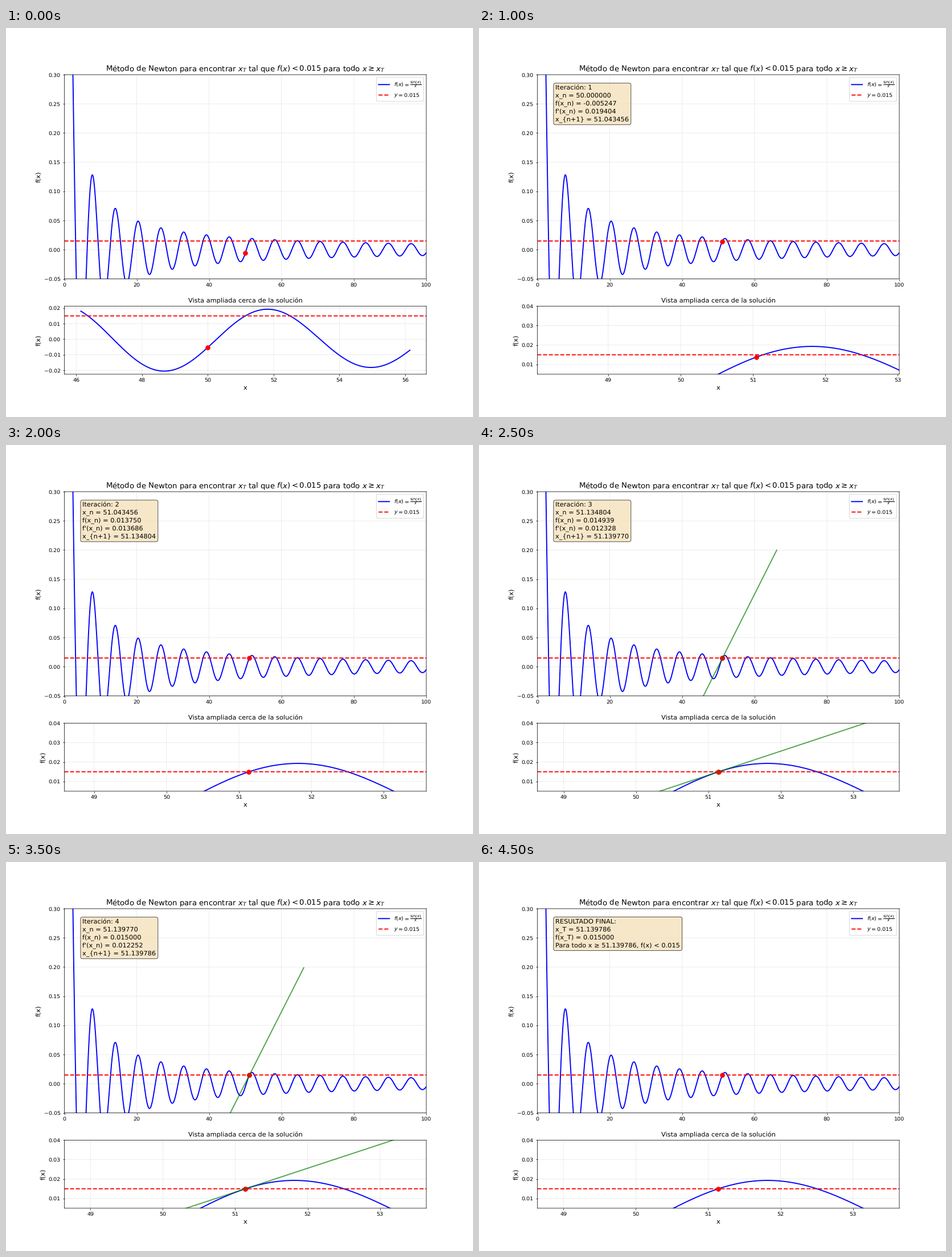
Write a matplotlib script that moves like this. It is 820 by 683 pixels and loops after 8 s.

```python
import numpy as np
import matplotlib.pyplot as plt
from matplotlib.animation import FuncAnimation

WIDTH, HEIGHT = 820, 683
DPI = WIDTH / 12
INTERVAL, FRAMES = 500, 16
THRESHOLD, START, STEPS = 0.015, 50.0, 4

# Soft, unsnapped rendering of text and lines.
plt.rcParams.update({"font.family": "DejaVu Sans", "text.hinting": "none",
                     "path.snap": False})


def f(x):
    return np.sin(x) / x


def slope(x):
    return np.cos(x) / x - np.sin(x) / x**2


guesses = [START]
for _ in range(STEPS):
    x = guesses[-1]
    guesses.append(x - (f(x) - THRESHOLD) / slope(x))
root = guesses[-1]

# The tiny surplus keeps the pixel size from being truncated.
fig, (top, zoom) = plt.subplots(
    2, 1, figsize=((WIDTH + 1e-4) / DPI, (HEIGHT + 1e-4) / DPI), dpi=DPI,
    gridspec_kw={"height_ratios": [3, 1]})


def add_artists(ax, xs):
    """Draw curve and threshold; return the moving dots and tangent."""
    ax.plot(xs, f(xs), "b-", lw=2, label=r"$f(x) = \frac{\sin(x)}{x}$")
    ax.axhline(THRESHOLD, color="r", ls="--", lw=2,
               label=rf"$y = {THRESHOLD}$")
    dots, = ax.plot([], [], "ro", ms=8)
    tangent, = ax.plot([], [], "g-", lw=2, alpha=0.7)
    ax.grid(True, alpha=0.3)
    ax.set_ylabel("f(x)", fontsize=12)
    return dots, tangent


views = [add_artists(top, np.linspace(0.1, 100, 1000)),
         add_artists(zoom, np.linspace(root - 5, root + 5, 1000))]

top.set_xlim(0, 100)
top.set_ylim(-0.05, 0.3)
top.set_title(r"Método de Newton para encontrar $x_T$ tal que "
              r"$f(x) < 0.015$ para todo $x \geq x_T$", fontsize=14)
top.legend(loc="upper right", fontsize=10)
zoom.set_title("Vista ampliada cerca de la solución", fontsize=12)
zoom.set_xlabel("x", fontsize=12)
wide_view = zoom.get_xlim(), zoom.get_ylim()

info = top.text(0.05, 0.95, "", transform=top.transAxes, fontsize=12,
                va="top", linespacing=1.36,
                bbox=dict(boxstyle="round", facecolor="wheat", alpha=0.7))


def step_text(n, x, x_next):
    return (f"Iteración: {n}\nx_n = {x:.6f}\nf(x_n) = {f(x):.6f}\n"
            f"f'(x_n) = {slope(x):.6f}\nx_{{n+1}} = {x_next:.6f}")


def final_text():
    return (f"RESULTADO FINAL:\nx_T = {root:.6f}\nf(x_T) = {f(root):.6f}\n"
            f"Para todo x ≥ {root:.6f}, f(x) < {THRESHOLD}")


def update(frame):
    line_x, line_y = [], []
    if frame == 0:
        dot_x, dot_y = [START], [f(START)]
        xlim, ylim = wide_view
        message = ""
    else:
        # Each step shows its tangent first, then the new point alone.
        step = min((frame - 1) // 2, STEPS - 1)
        x, x_next = guesses[step], guesses[step + 1]
        middle = (x + x_next) / 2
        xlim, ylim = (middle - 2.5, middle + 2.5), (0.005, 0.04)
        message = final_text() if frame > 2 * STEPS else step_text(
            step + 1, x, x_next)
        if frame < 2 * STEPS and frame % 2:
            dot_x, dot_y = [x, x_next], [f(x), THRESHOLD]
            line_x = np.array([x - 15, x + 15])
            line_y = f(x) + slope(x) * (line_x - x)
        else:
            dot_x, dot_y = [x_next], [f(x_next)]

    for dots, tangent in views:
        dots.set_data(dot_x, dot_y)
        tangent.set_data(line_x, line_y)
    zoom.set_xlim(xlim)
    zoom.set_ylim(ylim)
    info.set_text(message)
    return [info]


anim = FuncAnimation(fig, update, frames=FRAMES, interval=INTERVAL,
                     init_func=lambda: update(0), repeat=True,
                     repeat_delay=0, blit=False)
plt.show()
```
